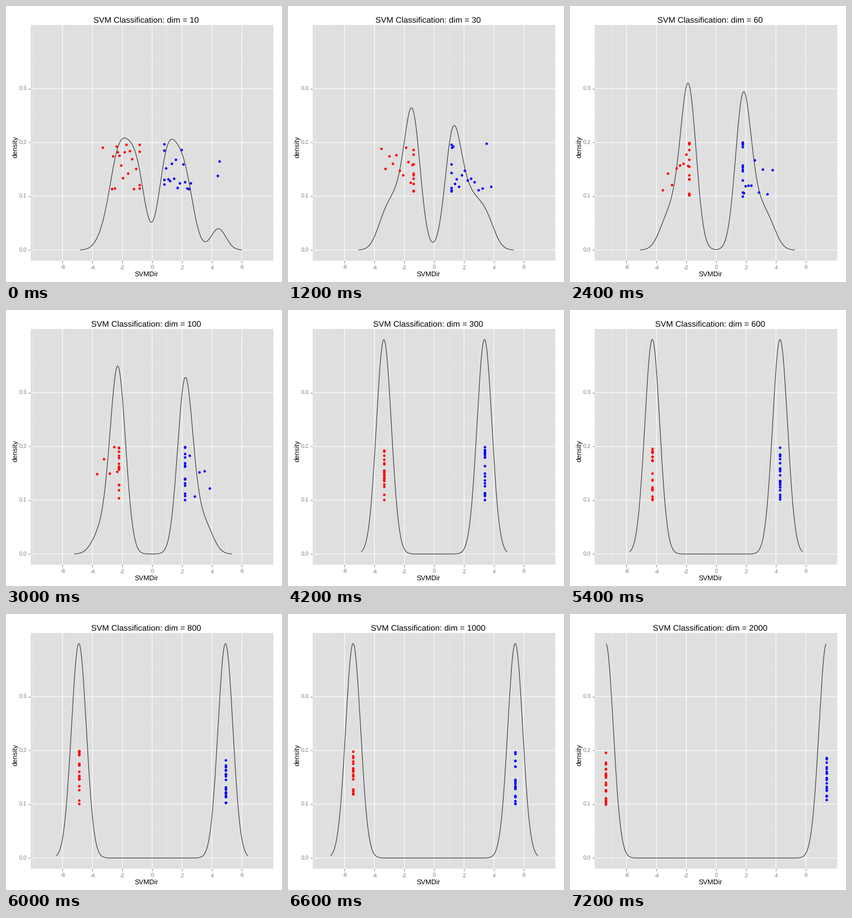
A matplotlib script for the animation above (7800 ms loop, 480 px wide and 480 px high).

```python
import numpy as np
import matplotlib.pyplot as plt
from matplotlib.animation import FuncAnimation

SIZE = 480
BANDWIDTH = 0.5
COUNT = 20
X_MAX, Y_MAX = 7.396, 0.399
LEFT, RIGHT, TOP, BOTTOM = 43, 465.4, 32.6, 443.05
PANEL, MINOR, TICK = "#dfdfdf", "#e8e8e8", "#7f7f7f"

plt.rcParams["font.family"] = "Liberation Sans"
plt.rcParams["text.hinting"] = "none"


def side(pile, loose=0, span=0, power=1.5, outliers=()):
    """Distances from zero: a pile on the margin, a ramp behind it, a few outliers."""
    ramp = pile + span * (np.arange(1, loose + 1) / max(loose, 1)) ** power
    rest = COUNT - loose - len(outliers)
    return np.r_[np.full(rest, pile), ramp, outliers]


# Dimension, red side, blue side
steps = [
    (10, side(0.86, 15, 1.85, 0.8, [3.32]), side(0.8, 14, 1.79, 1, [4.38, 4.5])),
    (20, side(1.08, 14, 2.1), side(1.0, 14, 2.7)),
    (30, side(1.38, 11, 2.18, 1.4), side(1.15, 14, 2.65, 1.6)),
    (40, side(1.5, 10, 2.0), side(1.45, 11, 2.5)),
    (60, side(1.8, 8, 1.78), side(1.75, 9, 2.0)),
    (100, side(2.26, 5, 1.445, 1.7), side(2.18, 5, 1.65, 1)),
    (200, side(2.88, 2, 0.51), side(2.88, 2, 1.4)),
]
# From here on every point lies on the margin.
steps += [(dim, side(pile), side(pile)) for dim, pile in
          [(300, 3.37), (400, 3.53), (600, 4.28), (800, 4.91), (1000, 5.43), (2000, 7.39)]]


def density(points):
    reach = 3 * BANDWIDTH
    limit = X_MAX - 0.04
    x = np.linspace(max(points.min() - reach, -limit),
                    min(points.max() + reach, limit), 512)
    z = (x[:, None] - points) / BANDWIDTH
    y = np.exp(-z * z / 2).mean(axis=1) / (BANDWIDTH * np.sqrt(2 * np.pi))
    return x, y


# At 72 dpi one point is one pixel.
fig = plt.figure(figsize=(SIZE / 72, SIZE / 72), dpi=72, facecolor="white")
ax = fig.add_axes([LEFT / SIZE, 1 - BOTTOM / SIZE,
                   (RIGHT - LEFT) / SIZE, (BOTTOM - TOP) / SIZE])
ax.set_facecolor(PANEL)
ax.set_xlim(-1.1 * X_MAX, 1.1 * X_MAX)
ax.set_ylim(-0.05 * Y_MAX, 1.05 * Y_MAX)
for spine in ax.spines.values():
    spine.set_visible(False)

x_major, y_major = np.arange(-6, 7, 2), np.arange(4) / 10
ax.set_xticks(x_major, labels=[])
ax.set_yticks(y_major, labels=[])
ax.tick_params(length=4.2, width=1, color=TICK)


def grid(xs, ys, color, width, order):
    style = dict(color=color, lw=width, zorder=order, snap=False)
    for x in xs:
        ax.axvline(x, **style)
    for y in ys:
        ax.axhline(y, **style)


grid(np.r_[np.arange(-7, 8, 2), -8, 8], np.r_[y_major + 0.05, 0.4], MINOR, 0.8, 1)
grid(x_major, y_major, "white", 1.07, 2)


def label(x, y, text, size, ha="center", **style):
    return fig.text(x / SIZE, 1 - y / SIZE, text, fontsize=size,
                    ha=ha, va="baseline", **style)


def to_px(x, y):
    px, py = ax.transData.transform((x, y))
    return px, SIZE - py


for x in x_major:
    label(to_px(x, 0)[0], 458.3, f"{x}", 9.6, color=TICK)
for y in y_major:
    label(36, to_px(0, y)[1] + 3.5, f"{y:.1f}", 9.6, "right", color=TICK)
label(244, 470, "SVMDir", 12)
label(19.8, 245, "density", 12, rotation=90, rotation_mode="anchor")
title = label(244, 28.7, "", 14.4)

curve, = ax.plot([], [], color="#333333", lw=1.07, zorder=3, snap=False)
dots = [ax.scatter([], [], s=4.4 ** 2, color=c, linewidths=0, zorder=4, clip_on=False)
        for c in ("red", "blue")]


def draw(i):
    dim, red, blue = steps[i]
    rng = np.random.default_rng(dim)
    title.set_text(f"SVM Classification: dim = {dim}")
    curve.set_data(*density(np.r_[-red, blue]))
    for dot, x in zip(dots, (-red, blue)):
        dot.set_offsets(np.c_[x, rng.uniform(0.1, 0.2, COUNT)])
    return [title, curve, *dots]


anim = FuncAnimation(fig, draw, frames=len(steps), interval=600, repeat=True)
plt.show()
```
